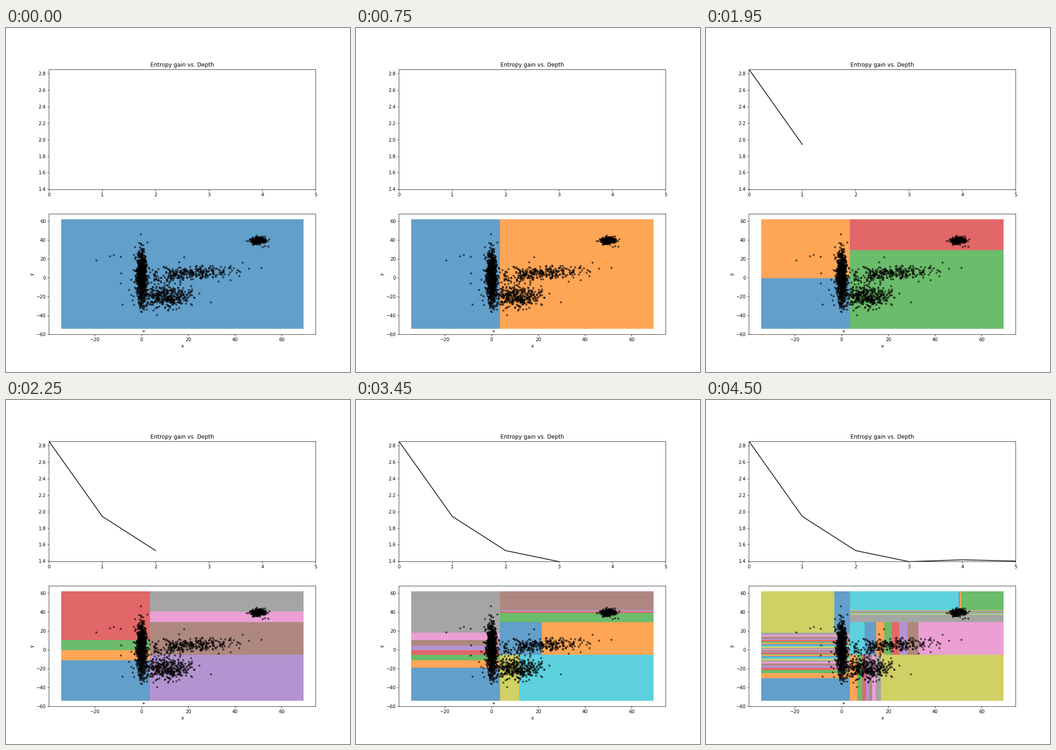
Write a matplotlib script that moves like this. It is 748 by 748 pixels and loops after 5.25 s.

```python
import numpy as np
import matplotlib.pyplot as plt
from matplotlib.animation import FuncAnimation
from matplotlib.patches import Rectangle

X, Y = 0, 1
BOX = ((-34.45, 69.4), (-54.18, 62.18))
ENTROPY = [2.854, 1.942, 1.527, 1.393, 1.415, 1.400]
MAX_DEPTH = 6


def normal_quantile(p):
    """Tukey lambda approximation of the inverse normal distribution."""
    return (p ** 0.135 - (1 - p) ** 0.135) / 0.1975


def cut(box, axis, edges):
    """Slice a box along one axis at the given inner edges."""
    lo, hi = box[axis]
    edges = [lo, *edges, hi]
    spans = zip(edges, edges[1:])
    return [(s, box[Y]) if axis == X else (box[X], s) for s in spans]


def quantile_cut(box, axis, mean, sd, n):
    """Slice a box into n parts that hold equal shares of a normal cloud."""
    return cut(box, axis, mean + sd * normal_quantile(np.arange(1, n) / n))


def rows_with_cap(box, mean, sd, n, limit, cap):
    """Slice into rows; past the limit the top row is sliced across instead."""
    rows = quantile_cut(box, Y, mean, sd, n)
    if n <= limit:
        return rows
    keep = n - n // limit
    top = (box[X], (rows[keep][Y][0], box[Y][1]))
    return rows[:keep] + quantile_cut(top, X, *cap)


def partition(depth):
    if depth == 0:
        return [BOX]
    left, right = cut(BOX, X, [3.67])
    if depth == 1:
        return [left, right]
    low, high = cut(right, Y, [29.6])
    parts = rows_with_cap(left, -0.5, 16, 2 ** (depth - 1), 8,
                          (-3.1, 0.1, depth - 3))
    if depth == 2:
        return parts + [low, high]
    bottom_box, middle_box = cut(low, Y, [-5.4])
    n = 2 ** (depth - 3)
    parts += quantile_cut(bottom_box, X, 11.8, 4.3, n)
    parts += quantile_cut(middle_box, X, 21.5, 10, n)
    parts += rows_with_cap(high, 40.6, 2.1, 2 * n, 4, (50.7, 1, n // 2))
    return parts


def sample_points():
    rng = np.random.default_rng(4)

    def blob(n, center, spread, slope=0):
        x, y = rng.normal(0, 1, (2, n)) * np.reshape(spread, (2, 1))
        return np.column_stack([x + center[X], y + slope * x + center[Y]])

    return np.vstack([
        blob(950, (0, 0), (1, 14)),
        blob(400, (10.5, -20), (5.5, 5.5)),
        blob(290, (21.5, 5), (9.5, 3.6), 0.15),
        blob(230, (50, 40), (1.8, 1.9)),
        blob(60, (7, 0), (6, 12)),
        [(-19.4, 18.6), (-13.6, 23), (-12, 24.5), (-8.2, -28.2),
         (29.7, -26), (46, 10)],
    ])


LEVELS = [partition(d) for d in range(MAX_DEPTH + 1)]

fig, (top, bottom) = plt.subplots(2, 1, figsize=(748.001 / 72,) * 2, dpi=72)
fig.subplots_adjust(left=0.1249, hspace=0.201)

top.set_title("Entropy gain vs. Depth")
top.set_xlim(0, 5)
top.set_ylim(min(ENTROPY), max(ENTROPY))
curve, = top.plot([], [], color="black", alpha=0.8, lw=2)

bottom.set_xlim(-39.64, 74.58)
bottom.set_ylim(-60.01, 68)
bottom.set_xlabel("x")
bottom.set_ylabel("y")
bottom.scatter(*sample_points().T, s=20, c="black", alpha=0.6, lw=0, zorder=2)

cells = []
for i in range(len(LEVELS[-1])):
    cell = Rectangle((0, 0), 0, 0, fc=f"C{i % 10}", alpha=0.7, lw=0, zorder=1)
    cells.append(bottom.add_patch(cell))


def update(depth):
    for cell in cells:
        cell.set_visible(False)
    for cell, ((x0, x1), (y0, y1)) in zip(cells, LEVELS[depth]):
        cell.set_bounds(x0, y0, x1 - x0, y1 - y0)
        cell.set_visible(True)
    curve.set_data(range(depth), ENTROPY[:depth])
    return [curve, *cells]


anim = FuncAnimation(fig, update, frames=len(LEVELS), interval=750,
                     repeat=True, repeat_delay=0)
plt.show()
```
